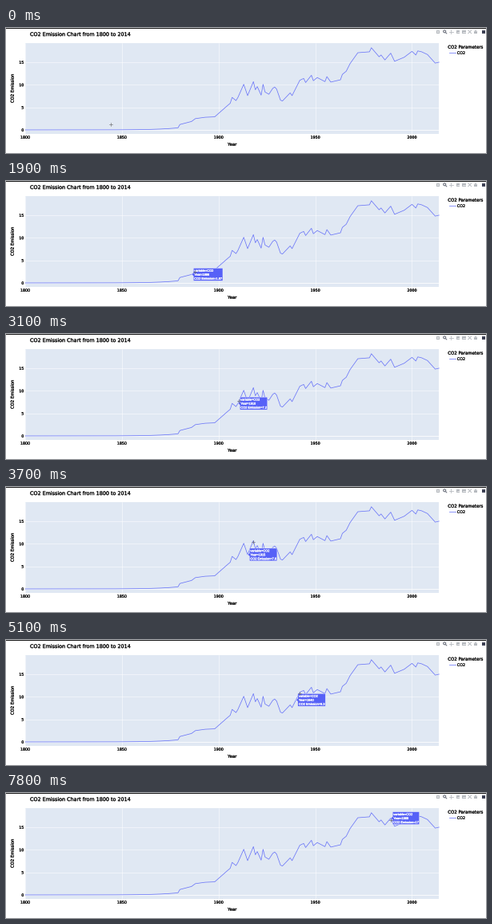
Write a matplotlib script that moves like this. It is 600x157 px and loops after 8000 ms.

```python
import numpy as np
import matplotlib.pyplot as plt
from matplotlib.animation import FuncAnimation
from matplotlib.patches import Circle, Polygon, Rectangle
from matplotlib.patheffects import withStroke

W, H, DPI = 600, 157, 100
FRAMES, STEP = 80, 100
PX = 72 / DPI  # points per pixel

BLUE, PLOT_BG, INK, ICON = "#6873f8", "#e0e8f3", "#0c0c0c", "#b4b8bd"
HOVER_BG = "#5661f7"
LEFT, RIGHT, TOP, BOTTOM = 24, 541.3, 19, 133
YEAR_W, UNIT_H, ZERO_Y = 2.4174, 5.67, 128

plt.rcParams["text.hinting"] = "none"
plt.rcParams["font.family"] = "DejaVu Sans"

# Turning points of the curve; before them emissions grow exponentially
TURNS = [(1880, 1.2), (1886, 1.87), (1888, 2.5), (1893, 2.8), (1898, 2.9),
         (1903, 4.8), (1906, 5.9), (1907, 7.2), (1909, 6.5), (1910, 7.2),
         (1913, 10.1), (1915, 7.6), (1918, 10.7), (1919, 8.9), (1920, 9.6),
         (1922, 7.7), (1923, 10.1), (1924, 8.4), (1926, 7.9), (1928, 9.2),
         (1929, 9.5), (1930, 9.04), (1932, 6.6), (1933, 6.4), (1937, 8.2),
         (1938, 7.6), (1942, 11), (1944, 11.4), (1945, 10.5), (1948, 12.1),
         (1949, 10.9), (1951, 11.6), (1955, 10.7), (1956, 11.8), (1958, 10.6),
         (1963, 11.1), (1964, 12.3), (1966, 13), (1968, 14.7), (1972, 17.1),
         (1978, 17.3), (1979, 18.2), (1983, 16.2), (1984, 16.6), (1986, 15.5),
         (1989, 17), (1991, 15.2), (1996, 16.1), (2000, 17.4), (2002, 16.6),
         (2003, 17.5), (2005, 17.3), (2008, 16.7), (2012, 14.8), (2014, 15)]
years = np.arange(1800, 2015)
values = np.where(years < 1880, 0.0316 * np.exp((years - 1852) / 10),
                  np.interp(years, *zip(*TURNS)))


def to_x(year):
    return LEFT + (year - 1800) * YEAR_W


def to_y(value):
    return ZERO_Y - value * UNIT_H


fig = plt.figure(figsize=(W / DPI, H / DPI), dpi=DPI, facecolor="white")
ax = fig.add_axes([0, 0, 1, 1])
ax.set(xlim=(0, W), ylim=(H, 0))
ax.axis("off")


def text(x, y, s, size, ha="left", color=INK, **kw):
    """Text with a hairline outline, for a slightly heavier weight."""
    outline = withStroke(linewidth=0.22 * PX, foreground=color)
    return ax.text(x, y, s, fontsize=size * PX, ha=ha, color=color,
                   path_effects=[outline], **{"va": "center_baseline", **kw})


def rect(x, y, w, h, color):
    ax.add_patch(Rectangle((x, y), w, h, fc=color, lw=0))


def line(xs, ys, color, width, **kw):
    return ax.plot(xs, ys, color=color, lw=width * PX, **kw)[0]


def plus(x, y, r, color, width, **kw):
    return [line([x - r, x + r], [y, y], color, width, **kw),
            line([x, x], [y - r, y + r], color, width, **kw)]


def draw_chart():
    rect(0, 0, W, 1, "#202020")
    rect(LEFT, TOP, RIGHT - LEFT, BOTTOM - TOP, PLOT_BG)
    for year in range(1800, 2001, 50):
        x = to_x(year)
        line([x, x], [TOP, BOTTOM], "white", 0.5)
        text(x, 137, str(year), 4.75, "center")
    for v in range(0, 16, 5):
        y = to_y(v)
        line([LEFT, RIGHT], [y, y], "white", 0.5 if v else 0.8)
        text(22.3, y, str(v), 4.75, "right")
    line(to_x(years), to_y(values), BLUE, 0.75, solid_joinstyle="round")
    text(30, 7.8, "CO2 Emission Chart from 1800 to 2014", 6.4)
    text(282.7, 146, "Year", 5.35, "center")
    text(8.3, 76, "CO2 Emission", 5.3, "center", rotation=90, va="center")
    text(552.3, 23.8, "CO2 Parameters", 5.4)
    line([553.5, 561.5], [30.7, 30.7], BLUE, 0.75)
    text(563.8, 31, "CO2", 4.8)


def draw_toolbar(y=4.8):
    rect(537.6, y - 1.4, 4.8, 3.2, ICON)
    ax.add_patch(Circle((540, y + 0.2), 0.9, fc="white", lw=0))
    ax.add_patch(Circle((548.2, y - 0.5), 1.5, fc="none", ec="#707580", lw=0.8))
    line([549.3, 550.8], [y + 0.6, y + 2.1], "#707580", 1.1)
    plus(556.3, y, 2.5, ICON, 0.8)
    for x in (565, 572.5):
        rect(x - 2.2, y - 2.2, 4.4, 4.4, ICON)
        line([x - 1.3, x + 1.3], [y, y], "white", 0.7)
    for d in (-2, 2):
        line([577.7, 581.7], [y - d, y + d], ICON, 0.9)
    ax.add_patch(Polygon([(584.5, y), (587, y - 2.3), (589.5, y)], fc=ICON, lw=0))
    rect(585.4, y, 3.2, 2, ICON)
    rect(594.6, y - 2.2, 4.4, 4.4, "#3b3f52")


draw_chart()
draw_toolbar()

box = ax.add_patch(Polygon([(0, 0), (1, 0), (1, 1)], fc=HOVER_BG, ec="white",
                           lw=0.4 * PX, zorder=5))
rows = [text(0, 0, "", 3.9, color="white", family="Liberation Sans", zorder=6)
        for _ in range(3)]
cursor = plus(0, 0, 2, "#666666", 0.6, zorder=7)

# Pointer stops: time (s), year, distance below the curve (px)
STOPS = [(0, 1844.3, -7), (.3, 1842, -3), (.7, 1844, -1), (1.8, 1886, 0),
         (2.6, 1900, 0), (3, 1910, 0), (3.5, 1913, 0), (4.2, 1930, 3),
         (4.6, 1930.4, 2), (5.4, 1948.9, 1), (6, 1947.7, 57),
         (6.3, 1947.7, 57), (6.9, 1991, 2), (7.1, 1989, 2)]
HOVER_RANGE, LAG = 6.5, 0.1


def pointer(t):
    times, at_years, gaps = zip(*STOPS)
    return np.interp(t, times, at_years), np.interp(t, times, gaps)


def show_hover(year):
    k = int(round(year)) - 1800
    px, py = to_x(years[k]), to_y(values[k])
    lines = ("variable=CO2", f"Year={years[k]}", f"CO2 Emission={values[k]:.3g}")
    for n, (row, s) in enumerate(zip(rows, lines)):
        row.set_text(s)
        row.set_position((px + 3.4, py + 5 * (n - 1)))
    extent = rows[2].get_window_extent().transformed(ax.transData.inverted())
    x0, x1 = px + 2.3, px + 4.5 + abs(extent.width)
    box.set_xy([(px, py), (x0, py - 2), (x0, py - 8), (x1, py - 8),
                (x1, py + 8), (x0, py + 8), (x0, py + 2)])


def update(i):
    t = i * STEP / 1000
    hover_year, hover_gap = pointer(t - LAG)
    hovering = abs(hover_gap) < HOVER_RANGE
    for part in (box, *rows):
        part.set_visible(hovering)
    if hovering:
        show_hover(hover_year)
    year, gap = pointer(t)
    x, y = to_x(year), to_y(np.interp(year, years, values)) + gap
    cursor[0].set_data([x - 2, x + 2], [y, y])
    cursor[1].set_data([x, x], [y - 2, y + 2])
    return [box, *rows, *cursor]


anim = FuncAnimation(fig, update, frames=FRAMES, interval=STEP,
                     init_func=lambda: update(0), repeat=True, repeat_delay=0)
plt.show()
```
